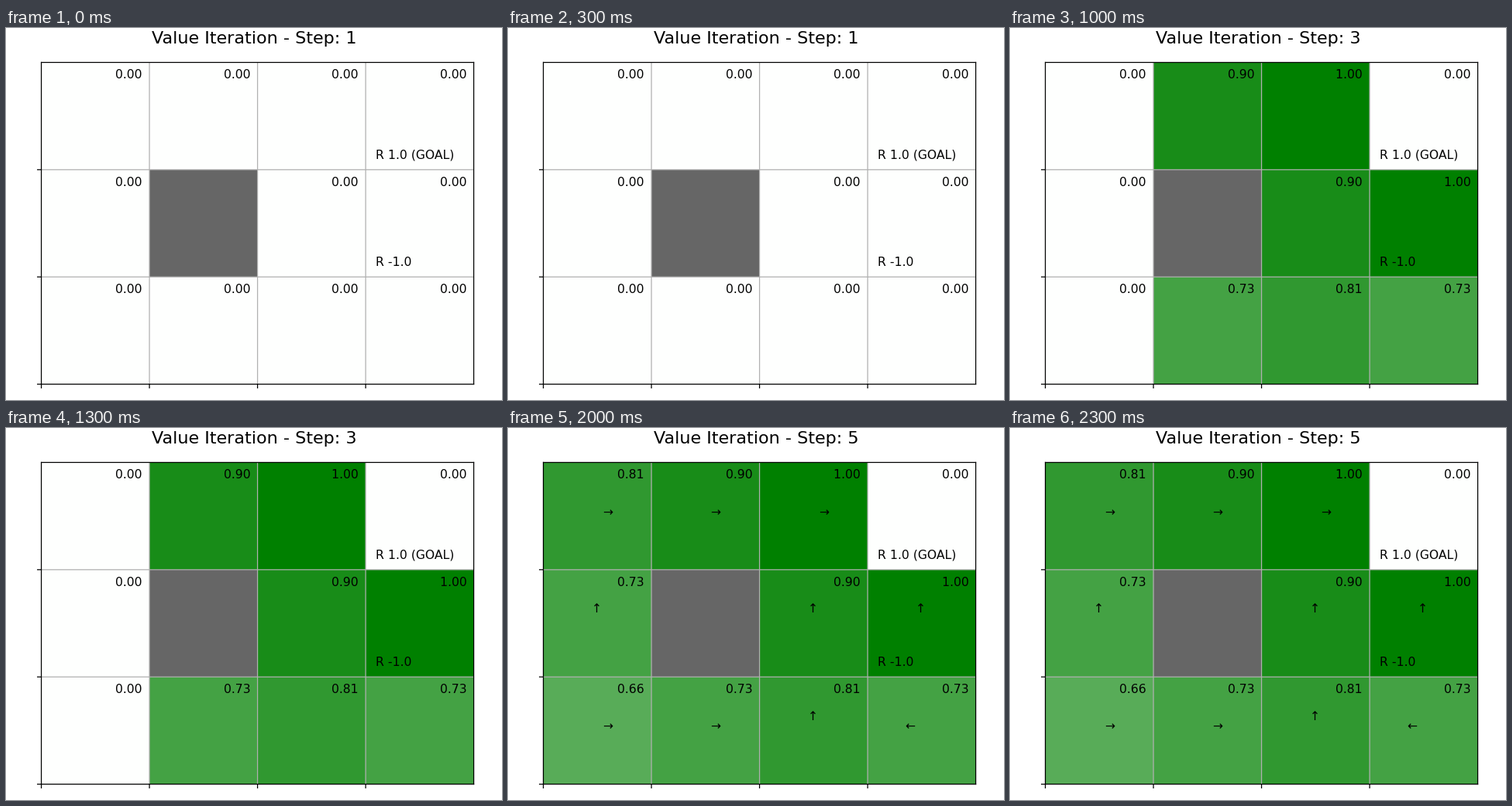
A matplotlib script for the animation above (2500 ms loop, 640 by 480 pixels).

```python
import matplotlib.pyplot as plt
import numpy as np
from matplotlib.animation import FuncAnimation
from matplotlib.colors import LinearSegmentedColormap

W, H, DPI = 640, 480, 100
ROWS, COLS = 3, 4
GAMMA = 0.9
GOAL, TRAP, WALL = (0, 3), (1, 3), (1, 1)
REWARDS = {GOAL: 1.0, TRAP: -1.0}
CELLS = [(y, x) for y in range(ROWS) for x in range(COLS) if (y, x) != WALL]

# arrow -> (row step, column step)
MOVES = {"↑": (-1, 0), "↓": (1, 0), "←": (0, -1), "→": (0, 1)}

# axes box in pixels, measured from the lower left corner
LEFT, BOTTOM, WIDTH, HEIGHT = 45.5625, 20.4375, 558, 415.125
LINE = 0.9
TICK = 5.5
FONT = 11.25


def action_values(v, cell):
    out = {}
    for arrow, (dy, dx) in MOVES.items():
        nxt = (cell[0] + dy, cell[1] + dx)
        inside = 0 <= nxt[0] < ROWS and 0 <= nxt[1] < COLS
        if not inside or nxt == WALL:
            nxt = cell
        out[arrow] = REWARDS.get(nxt, 0.0) + GAMMA * v[nxt]
    return out


def sweep(v):
    """One in-place pass of value iteration."""
    v = v.copy()
    for cell in CELLS:
        if cell != GOAL:
            v[cell] = max(action_values(v, cell).values())
    return v


def greedy(v, cell):
    q = action_values(v, cell)
    best = max(q.values())
    return [a for a in MOVES if np.isclose(q[a], best)][-1]


history = [np.zeros((ROWS, COLS))]
for _ in range(3):
    history.append(sweep(history[-1]))
history.append(history[-1])

fig = plt.figure(figsize=(W / DPI, H / DPI), dpi=DPI, facecolor="white")
ax = fig.add_axes([LEFT / W, BOTTOM / H, WIDTH / W, HEIGHT / H])
ax.set(xlim=(0, COLS), ylim=(0, ROWS), xticks=[], yticks=[])
for spine in ax.spines.values():
    spine.set(linewidth=LINE, snap=False)


def line(xs, ys, color, z):
    ax.plot(xs, ys, color=color, lw=LINE, zorder=z, snap=False,
            clip_on=False, solid_capstyle="butt")


tick_x = TICK * COLS / WIDTH
tick_y = TICK * ROWS / HEIGHT
for x in range(COLS):
    line([x, x], [0, -tick_y], "black", 2.6)
    if x:
        line([x, x], [0, ROWS], "#b0b0b0", 1.5)
for y in range(ROWS):
    line([0, -tick_x], [y, y], "black", 2.6)
    if y:
        line([0, COLS], [y, y], "#b0b0b0", 1.5)

cmap = LinearSegmentedColormap.from_list("values", ["red", "white", "green"])
mesh = ax.pcolormesh(np.flipud(history[0]), cmap=cmap, vmin=-1, vmax=1)
ax.add_patch(plt.Rectangle((WALL[1], ROWS - WALL[0] - 1), 1, 1,
                           fc=(0.4, 0.4, 0.4), zorder=1))
ax.set(xlim=(0, COLS), ylim=(0, ROWS))


def label(x, y, text=""):
    return ax.text(x, y, text, fontsize=FONT, family="DejaVu Sans")


for (y, x), reward in REWARDS.items():
    suffix = " (GOAL)" if (y, x) == GOAL else ""
    label(x + 0.096, ROWS - y - 0.9, f"R {reward}{suffix}")

values = {(y, x): label(x + 0.4, ROWS - y - 0.15) for y, x in CELLS}
arrows = []
for y, x in CELLS:
    if (y, x) != GOAL:
        arrow = greedy(history[-1], (y, x))
        dy, dx = MOVES[arrow]
        arrows.append(label(x + 0.446 + 0.1 * dx,
                            ROWS - y - 0.5 - 0.1 * dy, arrow))

title = fig.text(0.5, 460 / H, "", fontsize=16, ha="center", va="baseline",
                 family="DejaVu Sans")


def update(i):
    v = history[i]
    title.set_text(f"Value Iteration - Step: {i + 1}")
    mesh.set_array(np.flipud(v))
    for cell, text in values.items():
        text.set_text(f"{v[cell]:12.2f}")
    for text in arrows:
        text.set_visible(i == len(history) - 1)
    return [mesh, title, *values.values(), *arrows]


anim = FuncAnimation(fig, update, frames=len(history), interval=500,
                     repeat=True, repeat_delay=0, blit=False)
plt.show()
```
